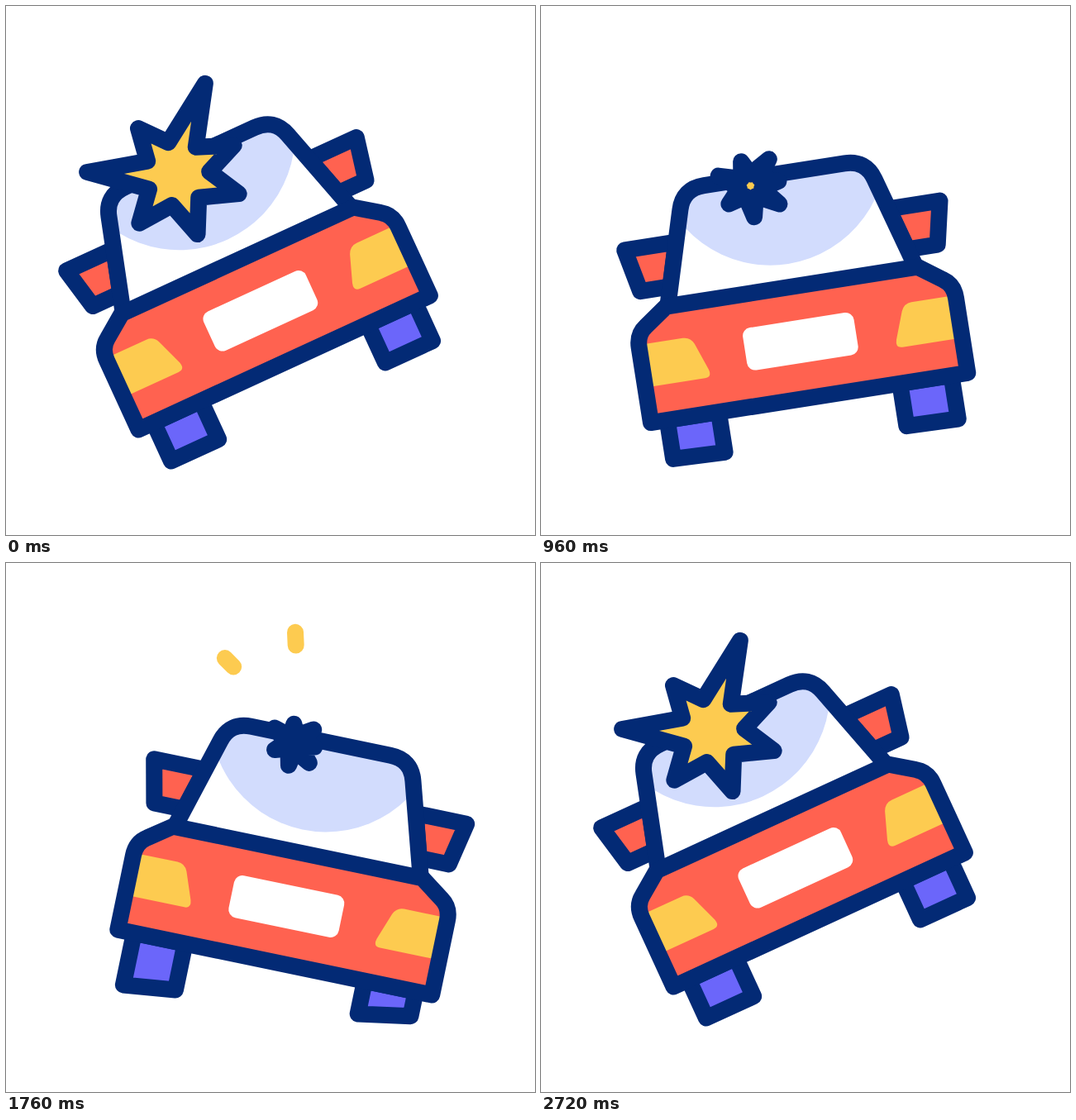
These frames come from a looping animation (640x640 px, 2.8 s). An HTML page:

```html
<!DOCTYPE html>
<html lang="en">
<head>
<meta charset="utf-8">
<title>Car bump</title>
<style>
  html, body { margin: 0; width: 100%; height: 100%; overflow: hidden; background: #fff; }
  svg { display: block; width: 100vw; height: 100vh; }
  .line { stroke: #032a75; stroke-width: 20; stroke-linejoin: round; stroke-linecap: round; }
  .red { fill: #ff6250; }
  .yellow { fill: #fdcb50; }
  .wheel { fill: #6b66fa; }
  .spark { stroke: #fdcb50; stroke-width: 20; stroke-linecap: round; }
</style>
</head>
<body>
<svg viewBox="0 0 640 640">
  <defs>
    <path id="glass" d="M-152 -126L-119 -239Q-112 -263.5 -86 -263.5H86Q112 -263.5 119 -239L152 -126"/>
    <path id="mirror" class="line red" d="M-130 -201H-193L-182 -149H-145Z"/>
    <path id="lamp" class="yellow" d="M-190 -85H-140Q-131 -85 -127 -76L-115 -43Q-112 -33 -121 -33H-190Z"/>
    <clipPath id="pane"><use href="#glass"/></clipPath>
  </defs>
  <g id="car">
    <polygon class="line wheel"/>
    <polygon class="line wheel"/>
    <use href="#mirror"/>
    <use href="#mirror" transform="scale(-1 1)"/>
    <use href="#glass" fill="#fff"/>
    <circle cy="-294" r="140" fill="#d2dcfd" clip-path="url(#pane)"/>
    <use href="#glass" class="line" fill="none"/>
    <path id="body" class="red" d="M-194 10V-82Q-194 -98 -182 -106L-154 -126H154L182 -106Q194 -98 194 -82V10Z"/>
    <use href="#lamp"/>
    <use href="#lamp" transform="scale(-1 1)"/>
    <rect x="-68" y="-85" width="136" height="52" rx="10" fill="#fff"/>
    <use href="#body" class="line" style="fill-opacity:0"/>
    <polygon id="star" class="line yellow"/>
    <line class="spark"/><line class="spark"/><line class="spark"/><line class="spark"/>
  </g>
</svg>
<script>
const LOOP = 2800, STEP = 40;
const car = document.getElementById('car');
const star = document.getElementById('star');
const wheels = [...document.querySelectorAll('.wheel')];
const sparkLines = [...document.querySelectorAll('.spark')];

const clamp = v => Math.min(1, Math.max(0, v));
const mix = (a, b, k) => a + (b - a) * k;
const ramp = (t, from, to) => clamp((t - from) / (to - from));
const ease = (t, from, to) => {
  const s = ramp(t, from, to);
  return s * s * (3 - 2 * s);
};

// Star tips: full position, and how far out the tip sits when the star is spiky
const hub = [-33, -255], core = [-22, -252];
const tips = [
  { at: [67, -349], rest: .87 },
  { at: [92, -254], rest: .7 },
  { at: [81, -161], rest: .6 },
  { at: [-29, -124], rest: .61 },
  { at: [-123, -193], rest: .62 },
  { at: [-148, -313], rest: .76 },
  { at: [-47, -357], rest: .65 }
];

const sparks = [
  { from: [-43, -331], to: [-57, -386], start: 1180 },
  { from: [-90, -309], to: [-134, -338], start: 1180 },
  { from: [103, -315], to: [127, -355], start: 1860 },
  { from: [145, -278], to: [198, -299], start: 1860 }
];

// The pressed wheel flattens, the free one hangs lower
function wheelShape(side, lean) {
  const k = lean * side;
  const inner = 61 - k * (k > 0 ? 7.5 : 4.5);
  const outer = 61 - k * (k > 0 ? 15 : 9.5);
  return [[111 * side, 10], [111 * side, inner], [174 * side, outer], [174 * side, 10]];
}

function drawStar(size, bloom) {
  const scale = (p, k) => p.map((v, j) => mix(hub[j], v, k));
  const radius = mix(39, 61, bloom);
  const points = tips.flatMap(({ at, rest }, i) => {
    const a = (i / tips.length * 360 - 30) * Math.PI / 180;
    const notch = [core[0] + radius * Math.cos(a), core[1] + radius * Math.sin(a)];
    return [scale(at, size * mix(rest, 1, bloom)), scale(notch, size ** 1.2)];
  });
  star.style.display = size > .01 ? '' : 'none';
  star.setAttribute('points', points.join(' '));
}

function drawSparks(t) {
  sparks.forEach(({ from, to, start }, i) => {
    const head = ramp(t, start, start + 250), tail = ramp(t, start + 320, start + 680);
    const el = sparkLines[i];
    el.style.display = head > tail ? '' : 'none';
    [['x1', 0, tail], ['y1', 1, tail], ['x2', 0, head], ['y2', 1, head]]
      .forEach(([name, j, k]) => el.setAttribute(name, mix(from[j], to[j], k)));
  });
}

function draw(t) {
  // Four moves: tip further left, drop back, lean right, slam left
  const tip = ease(t, 40, 630);
  const drop = ease(t, 630, 1110);
  const lean = ease(t, 1400, 1950);
  const slam = 1 - (1 - ease(t, 2180, 2720)) ** 3.6;

  const deg = -24.7 - 13.8 * tip + 38.5 * drop + 16.2 * lean - 40.9 * slam;
  const x = 332.5 + 30.5 * tip - 52 * drop + 22.5 * lean - slam;
  const press = drop - tip + 1.9 * (lean - slam);

  const shapes = [-1, 1].map(side => wheelShape(side, press));
  shapes.forEach((pts, i) => wheels[i].setAttribute('points', pts.join(' ')));

  // Rest the lowest wheel corner on the ground
  const a = deg * Math.PI / 180;
  const low = Math.max(...shapes.flat().map(([px, py]) => px * Math.sin(a) + py * Math.cos(a)));
  const ground = 557.5 + Math.min(3, .005 * deg * deg);
  car.setAttribute('transform', `translate(${x} ${ground - low - 10}) rotate(${deg})`);

  const size = 1 - ease(t, 640, 1140) + ease(t, 1640, 2040);
  drawStar(size, tip - ease(t, 2160, 2400));
  drawSparks(t);
}

const begin = performance.now();
function tick() {
  const t = (performance.now() - begin) % LOOP;
  draw(Math.floor(t / STEP) * STEP);
  requestAnimationFrame(tick);
}
tick();
</script>
</body>
</html>
```
